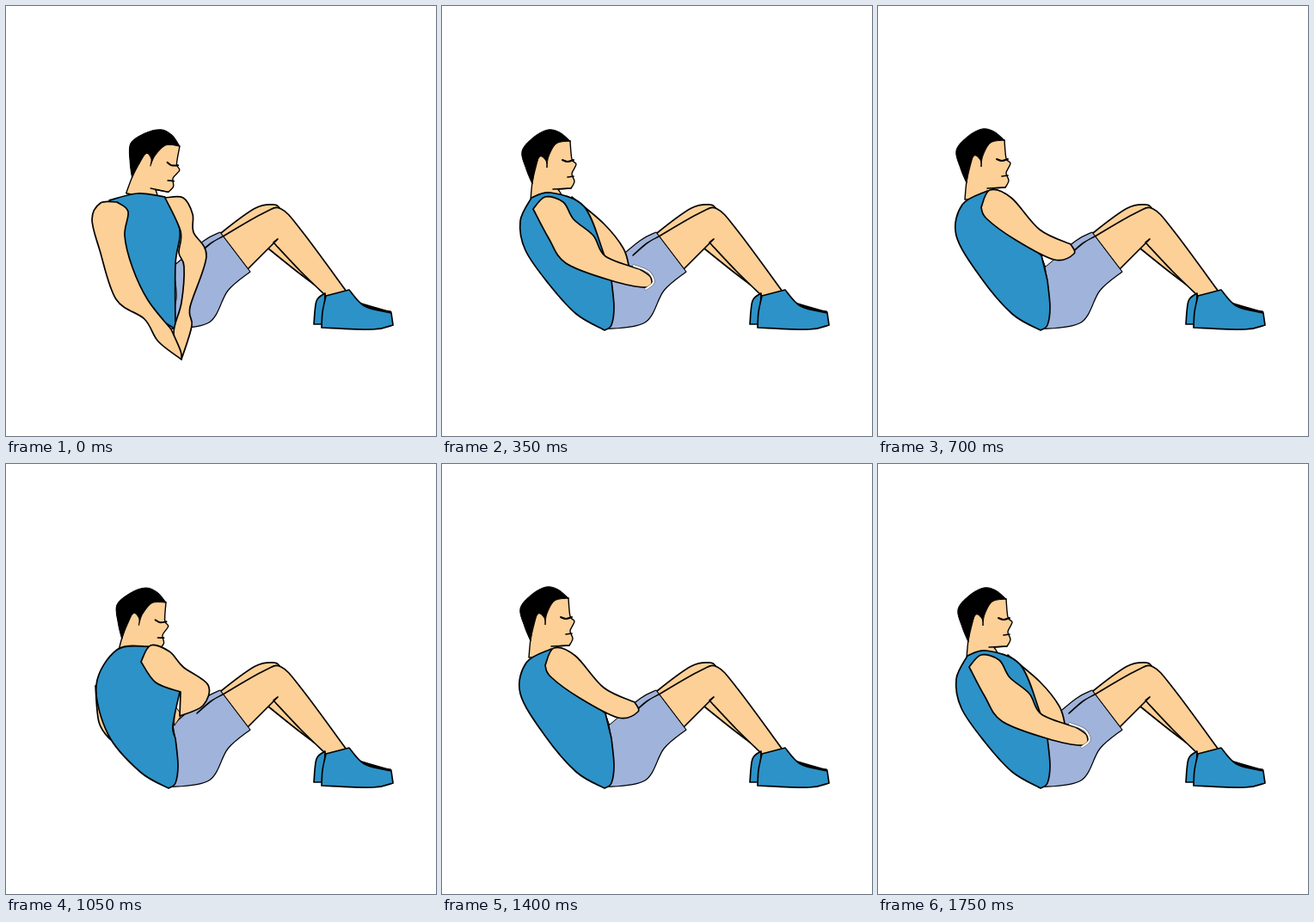
An HTML page with a canvas that plays this animation: 500x500 px, repeating every 2.1 s.

```html
<!DOCTYPE html>
<html lang="en">
<head>
<meta charset="utf-8">
<title>Seated twist</title>
<style>
  html, body { margin: 0; width: 100%; height: 100%; overflow: hidden; background: #fff; }
  canvas { display: block; }
</style>
</head>
<body>
<canvas id="stage" width="500" height="500"></canvas>
<script>
const ctx = document.getElementById('stage').getContext('2d');
const SKIN = '#fdd097', BLUE = '#2d92c7', SHORTS = '#a0b3da', INK = '#000';
const STEP = 350;

// Smooth curve through a few key points; "/" makes a sharp corner at the point before it.
function trace(text) {
  let last = null;
  ctx.beginPath();
  for (const part of text.split('/')) {
    const run = part.trim().split(/\s+/).map(p => p.split(',').map(Number));
    if (last) run.unshift(last); else ctx.moveTo(...run[0]);
    for (let i = 0; i < run.length - 1; i++) {
      const b = run[i], c = run[i + 1], a = run[i - 1] || b, d = run[i + 2] || c;
      ctx.bezierCurveTo(b[0] + (c[0] - a[0]) / 6, b[1] + (c[1] - a[1]) / 6,
        c[0] - (d[0] - b[0]) / 6, c[1] - (d[1] - b[1]) / 6, c[0], c[1]);
    }
    last = run[run.length - 1];
  }
}

function ink(width, color = INK) {
  ctx.lineWidth = width;
  ctx.strokeStyle = color;
  ctx.stroke();
}

function line(text, width = 1.7, color) {
  trace(text);
  ink(width, color);
}

function shape(fill, text, width = 1.7) {
  trace(text);
  ctx.closePath();
  ctx.fillStyle = fill;
  ctx.fill();
  ink(width);
}

// The head hangs from the hairline at (x, y) and leans forward by tilt degrees.
function head(x, y, tilt = 0) {
  ctx.save();
  ctx.translate(x, y);
  ctx.rotate(tilt * Math.PI / 180);
  shape(SKIN, '-40,30 -44,48 -46,69 / -12,66 -14,56 / 1,55 / 5,47 2,38 7,27 2,21 0,0 / -30,-8', 1.4);
  shape(INK, '0,0 -12,-10 -26,-13 -43,-4 -56,12 -51,33 -44,50 / -41,31 -35,18 -28,23 -27,31 / -25,18 -16,3 0,0', 1);
  line('-9,22 -3,24 4,22', 2);
  line('-3,42 4,41');
  line('-20,56 1,55', 1.5);
  ctx.restore();
}

// Side-on torso: the back runs down to a hip that every such pose shares.
function torso(back, front) {
  shape(BLUE, `${back} 156,358 189,377 / 197,371 200,350 197,319 / ${front}`);
}

function lowerBody() {
  shape(SKIN, '222,290 / 250,264 290,235 312,231 319,236 / 372,334 / 340,310 305,282 / 280,290');
  shape(SKIN, '252,268 299,241 320,236 345,263 396,332 / 373,338 / 342,308 311,275 / 316,271 / 281,306');
  shape(BLUE, '371,334 361,343 358,370 / 370,370');
  line('404,344 438,354 447,356', 3);
  shape(BLUE, '372,337 399,330 / 417,349 448,357 / 450,371 / 427,376 367,374 / 368,356 372,337');
  shape(SHORTS, '194,303 / 230,273 249,263 / 284,309 / 258,331 236,368 187,376 / 198,340 194,303', 1.2);
  line('252,268 238,276 222,290', 1.6);
}

function forwardTurn() {
  head(202, 163, 15);
  shape(BLUE, '120,226 153,218 185,222 / 202,260 197,300 197,376 / 160,345 130,270');
  shape(SKIN, '185,223 206,223 217,242 218,263 233,291 214,350 216,372 204,411 / 195,380 204,345 207,303 201,287 203,262 185,223');
  shape(SKIN, '129,228 110,229 100,248 109,284 128,341 161,364 177,390 204,411 / 203,401 192,376 / 165,342 147,304 138,267 142,239 129,228');
}

function halfTurn() {
  head(149, 157);
  shape(SKIN, '151,222 188,253 211,282 218,306 / 188,300');
  torso('104,223 91,250 97,284 124,323', '187,285 165,233 126,217 104,223');
  shape(SKIN, '106,236 120,222 141,228 153,248 176,267 190,291 230,306 / 243,316 238,327 196,319 144,299 124,270 106,236');
  const wristband = '223,302 240,309 246,321 237,329';
  line(wristband, 3, '#555');
  line(wristband, 2, '#fff');
}

function sideView() {
  head(147, 156);
  shape('#fff', '190,290 / 207,293 / 195,303', 1);
  torso('127,215 98,231 91,267 119,315', '190,290 / 150,255');
  shape(SKIN, '120,234 130,214 155,223 188,260 224,277 / 228,288 205,295 160,272 126,247 120,234');
}

function backTurn() {
  head(186, 161, 9);
  shape(SKIN, '104,258 108,300 121,320 129,322 / 120,280');
  shape(SKIN, '196,280 / 204,292 / 196,304', 1);
  torso('165,212 129,216 105,257 119,315', '194,304 202,265 / 180,240');
  shape(SKIN, '157,230 168,211 190,218 206,236 235,257 229,281 202,293 / 203,265 / 174,254 157,230');
}

const sequence = [forwardTurn, halfTurn, sideView, backTurn, sideView, halfTurn];
ctx.lineJoin = ctx.lineCap = 'round';
const start = performance.now();

function render(now) {
  const index = Math.floor(Math.max(0, now - start) / STEP) % sequence.length;
  ctx.clearRect(0, 0, 500, 500);
  lowerBody();
  sequence[index]();
  requestAnimationFrame(render);
}
render(start);
</script>
</body>
</html>
```
